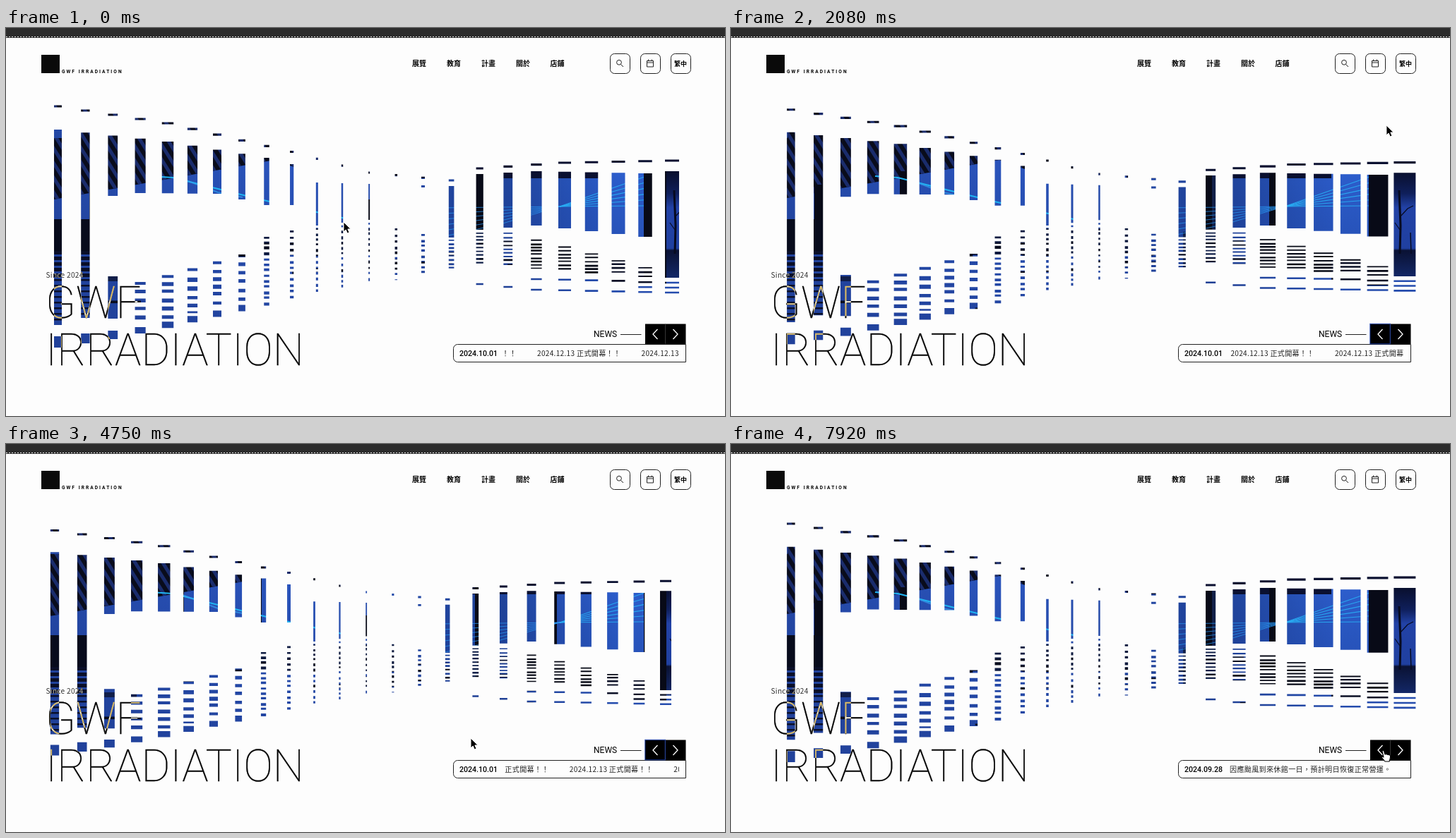
An HTML page with a canvas that plays this animation: 1018x550 px, repeating every 8.01 s.

```html
<!DOCTYPE html>
<html lang="zh-Hant">
<head>
<meta charset="utf-8">
<title>GWF IRRADIATION</title>
<style>
  html, body { margin: 0; width: 100%; height: 100%; overflow: hidden; background: #fdfdfd; }
  canvas, svg { position: absolute; left: 0; top: 0; width: 1018px; height: 550px; }
  .bar { position: absolute; left: 0; top: 0; width: 1018px; height: 14px; background: #2c2c2c; }
  .bar::after {
    content: ""; position: absolute; left: 0; right: 0; top: 12px; height: 1px;
    background: repeating-linear-gradient(90deg, #eee 0 2px, transparent 2px 4px);
  }
  .hero { mix-blend-mode: difference; fill: #fff; }
  .big { font: 100 62.5px Roboto, sans-serif; stroke: #fff; stroke-width: .3; }
  .thin { font: 300 10.1px "Noto Sans CJK TC", "Noto Sans CJK", sans-serif; letter-spacing: .3px; }
  .nav { font: 700 10px "Noto Sans CJK TC", "Noto Sans CJK", sans-serif; }
  .roman { font: 400 12px Roboto, sans-serif; }
  .date { font: 500 10.6px Roboto, sans-serif; }
  .brand { font: 700 6.6px Roboto, sans-serif; letter-spacing: 2.05px; }
  .line { fill: none; stroke: #222; stroke-width: 1; }
</style>
</head>
<body>
<canvas id="stage" width="1018" height="550"></canvas>
<div class="bar"></div>

<svg class="hero" viewBox="0 0 1018 550">
  <text class="thin" x="56.5" y="353.5" fill="#ccc">Since 2024</text>
  <text class="big" x="56" y="411">GWF</text>
  <text class="big" x="56" y="477.5">IRRADIATION</text>
</svg>

<svg viewBox="0 0 1018 550">
  <defs><clipPath id="window"><rect x="706" y="452" width="247" height="17"/></clipPath></defs>
  <rect x="50" y="38" width="26" height="26" fill="#0a0a0a"/>
  <text class="brand" x="79" y="63.5">GWF IRRADIATION</text>

  <g class="nav">
    <text x="575" y="54">展覽</text>
    <text x="624" y="54">教育</text>
    <text x="673" y="54">計畫</text>
    <text x="722" y="54">關於</text>
    <text x="770.5" y="54">店鋪</text>
    <text x="946" y="53.5" style="font-size:9px">繁中</text>
  </g>
  <g class="line">
    <rect x="855.5" y="36.5" width="28" height="28" rx="6"/>
    <rect x="898.5" y="36.5" width="28" height="28" rx="6"/>
    <rect x="941.5" y="36.5" width="28" height="28" rx="6"/>
    <path d="M870.5 51.5L874 55"/><circle cx="868" cy="48.8" r="3.4"/>
    <path d="M907.5 46.5h9v8.5h-9zM907.5 49h9M909.5 44.5v2M914.5 44.5v2"/>
    <path d="M870 434.5H899.5"/>
    <path d="M962.5 448.5V473.5H639.5a6 6 0 0 1-6-6V454.5a6 6 0 0 1 6-6Z"/>
  </g>
  <text class="roman" x="832" y="438.3">NEWS</text>
  <rect x="905" y="419.5" width="57.5" height="28.5"/>
  <path d="M933.5 419.5V448" stroke="#444" stroke-width=".8"/>
  <rect id="focus" x="904.8" y="419.3" width="28.5" height="28.5" fill="none" stroke="#2444a8"/>
  <path d="M922.5 427L916 434L922.5 441M944.5 427L951 434L944.5 441" fill="none" stroke="#fff" stroke-width="1.3"/>

  <text class="date" id="date" x="642" y="464.6"></text>
  <g clip-path="url(#window)"><g class="thin" id="news" fill="#222"></g></g>

  <g id="cursor" stroke-linejoin="round">
    <path d="M0 0V14L3.2 11L5.3 16L8 14.8L5.9 10H10.2Z" stroke="#fff"/>
    <g fill="none">
      <path id="beam" d="M-3 -7Q0 -7 0 -5Q0 -7 3 -7M0 -5V5M-3 7Q0 7 0 5Q0 7 3 7M-2 1H2" stroke="#fff" stroke-width="2.6"/>
      <use href="#beam" style="stroke:#000;stroke-width:1.2"/>
      <path d="M-3 -7Q0 -7 0 -5Q0 -7 3 -7M0 -5V5M-3 7Q0 7 0 5Q0 7 3 7M-2 1H2" stroke="#000" stroke-width="1.2"/>
    </g>
    <path d="M-2 -1Q-1 -2.6 .4 -1L2 4L4 3.4L6 4.4L8 4.6Q9.6 5 9.6 7L9 11L8 14H2L-2.6 8.6Q-3.4 7 -1.6 7L0 8Z" fill="#fff" stroke="#000" stroke-width="1.1"/>
  </g>
</svg>

<script>
const LOOP = 8010, STEP = 1000 / 12, COLUMNS = 24, MID = 281;
const $ = id => document.getElementById(id);
const ctx = $('stage').getContext('2d');
const lerp = (a, b, p) => a + (b - a) * p;
const smooth = p => p * p * (3 - 2 * p);

function random(seed) {
  return () => (seed = (seed * 16807) % 2147483647) / 2147483647;
}

// Straight lines through [position, value] points
function curve(...pts) {
  return x => {
    let k = 0;
    while (k < pts.length - 2 && x > pts[k + 1][0]) k++;
    const [x0, a] = pts[k], [x1, b] = pts[k + 1];
    return lerp(a, b, (x - x0) / (x1 - x0));
  };
}

// Outline of the resting columns
const centre = curve([0, 73.5], [4, 229], [8, 369], [11, 476], [14, 590.5], [19, 791], [23, 943]);
const width = curve([0, 11], [4, 16.5], [10, 3], [12, 2], [14, 5], [19, 18], [23, 20]);
const dash = curve([0, 111], [4, 135], [9, 175.5], [12, 205], [15, 216], [16, 199], [19, 191], [23, 188]);
const slabTop = curve([0, 144], [4, 161], [8, 184], [9, 193], [10, 219], [15, 224], [16, 207], [18, 203], [22, 206], [23, 203]);
const slabEnd = curve([0, 421], [1, 411], [2, 238], [3, 234], [6, 235], [8, 251], [9, 251], [10, 280], [12, 272],
  [13, 222], [14, 226], [15, 297], [16, 286], [18, 280], [22, 296], [23, 354]);
const runTop = curve([3, 360], [7, 321], [8, 296], [9, 287], [12, 276], [15, 300], [16, 290], [17, 290], [22, 339]);
const runEnd = curve([3, 433], [11, 370], [14, 351], [16, 334], [19, 345], [22, 353]);
const footLine = curve([16, 363], [18, 371], [23, 375]);

function columnParts(i) {
  const rnd = random(31 + i * 97);
  const parts = [[dash(i) - 1.6, dash(i) + 1.6], [slabTop(i), slabEnd(i)]];
  if (i < 3) parts.push([437 - 4 * i, 453 - 6 * i]);
  if (i === 2) parts.push([352, 412]);
  if (i > 2 && i < 23) {
    const pitch = i < 8 ? 12 : i < 15 ? 8 : 5.4;
    let y = runTop(i), end = runEnd(i);
    if (i < 8) parts.push([end - 9, end]), end -= 13;
    while (y < end - 1) {
      parts.push([y, Math.min(end, y + pitch * (.34 + .2 * rnd()))]);
      y += pitch * (.8 + .35 * rnd());
    }
  }
  if (i > 15) {
    const lines = i < 18 ? 1 : i < 22 ? 2 : 3, gap = i < 22 ? 15 : 7;
    for (let n = 0; n < lines; n++) parts.push([footLine(i) - n * gap - 1.3, footLine(i) - n * gap + 1.3]);
  }
  return parts;
}
const columns = Array.from({ length: COLUMNS }, (_, i) => columnParts(i));

// Tinted scene seen through the columns
function paintScene() {
  const cv = document.createElement('canvas');
  cv.width = 1018; cv.height = 550;
  const c = cv.getContext('2d'), rnd = random(77);
  const box = (color, x, y, w, h) => { c.fillStyle = color; c.fillRect(x, y, w, h); };
  const stroke = (color, w, ...pts) => {
    c.strokeStyle = color; c.lineWidth = w;
    c.beginPath(); pts.forEach(p => c.lineTo(...p)); c.stroke();
  };
  const blend = (x1, y1, ...stops) => {
    const g = c.createLinearGradient(0, x1 ? 0 : 200, x1, y1);
    stops.forEach(([at, color]) => g.addColorStop(at, color));
    return g;
  };
  box(blend(1018, 0, [0, '#2446a2'], [.4, '#2a54bc'], [.68, '#1f4298'], [.85, '#2d5ecd']), 0, 0, 1018, 550);
  box(blend(0, 400, [0, 'rgba(20,50,130,0)'], [1, 'rgba(30,60,145,.6)']), 0, 200, 1018, 350);

  // ceiling with slanted slats
  c.save();
  c.beginPath();
  [[40, 90], [560, 90], [560, 210], [430, 205], [380, 187], [40, 248]].forEach(p => c.lineTo(...p));
  c.clip();
  box('#090c1c', 0, 80, 600, 200);
  for (let x = -100; x < 560; x += 13) stroke('#1a2c6c', 5, [x, 90], [x + 100, 250]);
  c.restore();
  box('#2448a4', 50, 140, 30, 16);
  box('#0a1030', 560, 180, 290, 33);
  box('#0a1030', 850, 180, 130, 20);

  // streaky ground
  for (let n = 0; n < 150; n++) {
    const x = 135 + rnd() * 600, y = 300 + rnd() * 150;
    if (y < 345 || rnd() < .2) box('#080c1e', x, y, 20 + rnd() * 60, 2 + rnd() * 4);
  }
  box('rgba(8,12,30,.75)', 340, 284, 225, 38);
  box('#070a16', 735, 298, 165, 52);
  box('rgba(7,10,22,.6)', 640, 289, 55, 55);
  box('#0b1026', 850, 330, 85, 35);
  box('#070b1c', 40, 271, 95, 46);
  for (let y = 316; y < 416; y += 8) box('#0a0f28', 40, y, 95, y < 350 ? 5 : 2.5);
  box('rgba(10,15,38,.7)', 135, 352, 50, 7);

  // posts
  const post = (x, y, w, h) => box('#080a17', x, y, w, h);
  post(118, 222, 15, 50);
  post(239, 203, 13, 38);
  post(350, 182, 12, 75);
  post(502, 243, 18, 30);
  post(664, 203, 17, 84);
  box('#122048', 681, 208, 10, 79);
  post(762, 203, 18, 84);

  // light beams
  const cyan = '#1fb4f2';
  stroke(cyan, 2, [204, 210], [236, 212], [300, 228], [373, 246], [440, 261], [485, 271]);
  stroke('rgba(50,160,240,.7)', 2, [250, 214], [300, 233], [335, 240]);
  for (let k = 0; k < 6; k++) {
    stroke('rgba(40,175,245,.9)', 1.1, [784, 253], [904, 211 + k * 8.2]);
    stroke('rgba(40,150,240,.75)', 1, [784, 253], [700, 254 + k * 4.8], [610, 255 + k * 8.5]);
  }

  // dark wall and trees by the right edge
  post(903, 203, 36, 152);
  box(blend(0, 356, [0, '#080d28'], [.22, '#0f1f5a'], [.35, '#2242a6'], [.72, '#2040a0'], [.74, '#0a1234'], [1, '#14296a']),
    935, 200, 50, 156);
  const tree = '#070b20';
  stroke(tree, 3, [946, 230], [948, 280], [947, 320]);
  stroke(tree, 1.2, [947, 268], [958, 256], [966, 252]);
  stroke(tree, 1.2, [947, 286], [940, 276]);
  stroke(tree, 1.5, [962, 290], [963, 320]);
  return cv;
}
const scene = paintScene();

// A pose: column shift and width factor at five knots, then height factor
const knots = [0, 5, 11, 17, 23];
const rest = [0, 0, 0, 0, 0, 1, 1, 1, 1, 1, 1];
const left = [-10.5, -14, -9.5, -18.7, -26.5, 1.67, 1.45, 1.15, .93, .86, .916];
const right = [11.4, 10.8, 7, 8.7, 10.9, 1.05, 1.14, 1.2, 1.42, 1.55, .972];
const low = [-4.5, -5.4, -3.5, -6.4, -9, 1.12, 1.04, .9, .85, .8, .933];
const wide = [...right.slice(0, 10), .988];
const poses = [[0, rest], [750, left], [920, left], [1620, right], [2080, right], [2600, left],
  [3000, rest], [3450, rest], [4080, right], [4750, low], [5050, low], [5700, wide], [LOOP, wide]];

const path = [[0, [478, 275]], [750, [177, 147]], [950, [185, 155]], [1600, [966, 150]], [2080, [928, 138]],
  [2650, [200, 515]], [3000, [653, 460]], [4250, [984, 300]], [4750, [658, 417]], [5300, [1000, 420]],
  [5480, [953, 436]], [6500, [953, 436]], [7100, [924, 436]], [LOOP, [924, 436]]];

function track(keys, t) {
  let k = 0;
  while (k < keys.length - 2 && t >= keys[k + 1][0]) k++;
  const [t0, a] = keys[k], [t1, b] = keys[k + 1];
  const p = smooth((t - t0) / (t1 - t0));
  return a.map((v, n) => lerp(v, b[n], p));
}

function drawColumns(t) {
  const pose = track(poses, t), tall = pose[10];
  const shift = curve(...knots.map((k, n) => [k, pose[n]]));
  const widen = curve(...knots.map((k, n) => [k, pose[n + 5]]));
  ctx.fillStyle = '#fdfdfd';
  ctx.fillRect(0, 0, 1018, 550);
  ctx.save();
  ctx.beginPath();
  columns.forEach((parts, i) => {
    const w = width(i) * widen(i), x = centre(i) + shift(i) - w / 2;
    for (const [a, b] of parts) ctx.rect(x, MID + (a - MID) * tall, w, (b - a) * tall);
  });
  ctx.clip();
  ctx.drawImage(scene, 0, 0);
  ctx.restore();
}

// Each entry: start, date, text, slide direction
const closed = '因應颱風到來休館一日，預計明日恢復正常營運。';
const news = [
  [0, '2024.10.01', '2024.12.13 正式開幕！！', 0],
  [5500, '2024.09.28', closed, 1],
  [5980, '2024.09.13', '本館自113年9月3日起，新增週邊購票管道，歡迎多加利用。', 1],
  [7450, '2024.09.28', closed, -1]
];
const SPEED = .0214, GAP = 147.5;
let shown = -1;

function drawNews(t) {
  let k = news.length - 1;
  while (t < news[k][0]) k--;
  const [start, date, text, dir] = news[k], box = $('news');
  if (k !== shown) {
    shown = k;
    $('date').textContent = date;
    box.replaceChildren(...Array.from({ length: k ? 1 : 4 }, (_, n) => {
      const el = document.createElementNS('http://www.w3.org/2000/svg', 'text');
      el.setAttribute('x', n * GAP);
      el.textContent = text;
      return el;
    }));
  }
  const p = Math.min(1, (t - start) / 400);
  const x = text === closed ? 706 : (k ? 706 : 604.5) - (t - start) * SPEED;
  box.setAttribute('transform', `translate(${x} ${464.8 + dir * 15 * (1 - p) ** 2})`);
  $('focus').style.display = t > 40 && t < 5500 ? '' : 'none';
}

function drawCursor(t) {
  const [x, y] = track(path, t);
  const inside = (l, u, r, d) => x > l && x < r && y > u && y < d;
  const kind = inside(905, 419, 963, 448) ? 2 : inside(633, 448, 963, 474) ? 1 : 0;
  $('cursor').setAttribute('transform', `translate(${x} ${y})`);
  [...$('cursor').children].forEach((el, n) => el.style.display = n === kind ? '' : 'none');
}

// The picture advances twelve times a second
function frame() {
  const t = Math.min(95, Math.floor((performance.now() % LOOP + 5) / STEP)) * STEP;
  drawColumns(t);
  drawNews(t);
  drawCursor(t);
  requestAnimationFrame(frame);
}
frame();
</script>
</body>
</html>
```
